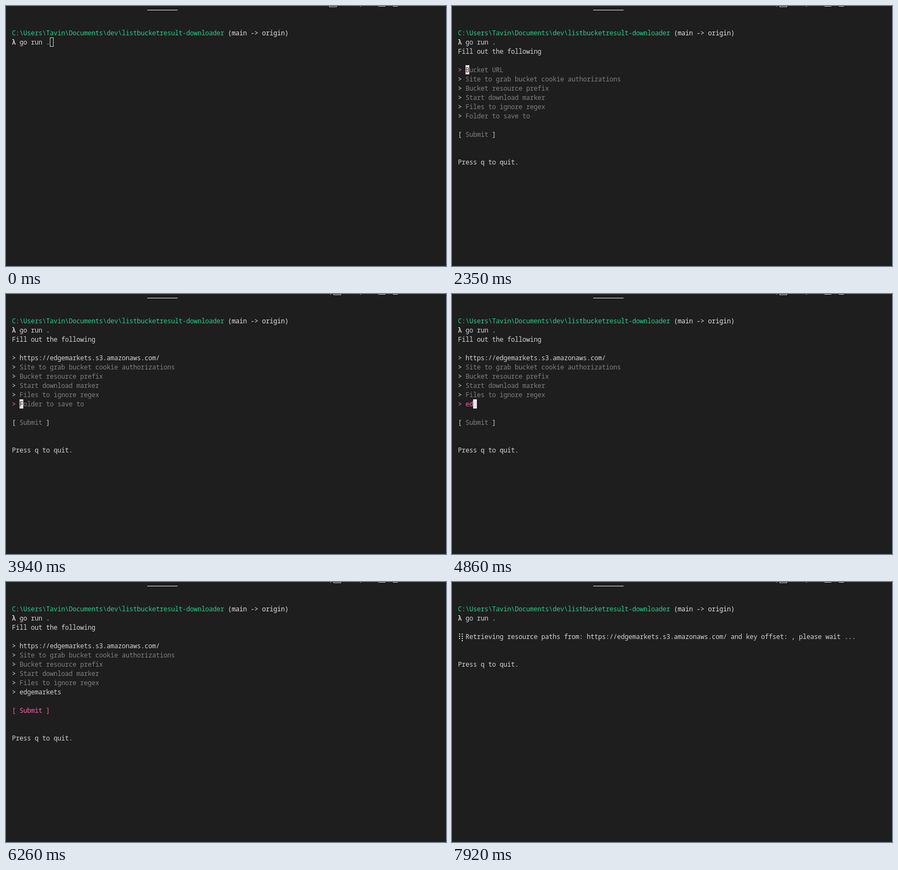
These frames come from a looping animation (813x479 px, 7.99 s). An HTML page:

```html
<!DOCTYPE html>
<html lang="en">
<head>
<meta charset="utf-8">
<title>Terminal form</title>
<style>
  html, body { margin: 0; width: 100%; height: 100%; overflow: hidden; background: #1e1e1e; }
  #stage { position: relative; width: 813px; height: 479px; overflow: hidden; color: #d4d4d4;
    font: 12px/17px "Noto Sans Mono", "DejaVu Sans Mono", monospace;
    letter-spacing: -.2px; font-variant-ligatures: none; }
  #stage div, #stage i, #pointer { position: absolute; }
  .row { left: 11px; height: 17px; white-space: pre; }
  .green { color: #23d18b; }
  .white { color: #e5e5e5; }
  .pink { color: #ff5faf; }
  .gray { color: #808080; }
  .cur { display: inline-block; width: 7px; height: 17px; vertical-align: top; background: #e5e5e5; color: #5a2028; }
  .term { background: #ccc; }
  .hollow { background: none; box-shadow: inset 0 0 0 1px #ccc; }
  .bar { background: #c5c5c5; height: 1px; }
  .box { width: 12px; height: 4px; top: -4px; border: 1px solid #c5c5c5; }
  .dot { width: 2px; height: 2px; background: #d4d4d4; }
  #pointer { left: 0; top: 0; }
</style>
</head>
<body>
<div id="stage">
  <div class="bar" style="left:261px;top:7px;width:56px;background:#e7e7e7"></div>
  <div class="box" id="icon"></div>
  <div class="bar" id="speck" style="left:599px;top:0;width:2px;background:#999"></div>
  <div class="bar" style="left:654px;top:0;width:2px;background:#999"></div>
  <div class="bar" style="left:688px;top:0;width:13px"></div>
  <div class="bar" style="left:715px;top:0;width:9px"></div>
  <div id="screen"></div>
  <svg id="pointer" width="7" height="16" fill="none" stroke="#f0f0f0">
    <path d="M0 .5h7M3.5 0v16M0 15.5h7"/>
  </svg>
</div>
<script>
const LOOP = 7990;
const URL_TEXT = "https://edgemarkets.s3.amazonaws.com/";
const FOLDER = "edgemarkets";
const LABELS = ["Bucket URL", "Site to grab bucket cookie authorizations", "Bucket resource prefix",
  "Start download marker", "Files to ignore regex", "Folder to save to"];

const FORM = 2350, BLINK = 2890, PASTE = 3150, SUBMIT = 6260, FETCH = 6720;
const TABS = [3420, 3550, 3680, 3810, 3940];
const KEYS = [4730, 4820, 4910, 5000, 5200, 5300, 5400, 5470, 5600, 5670, 5800];
const SPINS = [6820, 6920, 7020, 7120, 7220, 7320, 7460, 7575, 7690, 7805, 7920];

// Missing dot of each spinner phase, as column + 2 * row
const GAPS = [0, 2, 4, 6, 7, 5, 3, 1];
const DOT_X = [13, 18], DOT_Y = [95, 99, 103, 107];

const $ = id => document.getElementById(id);
const screenEl = $("screen"), pointer = $("pointer"), icon = $("icon"), speck = $("speck");

const passed = (times, t) => times.filter(x => t >= x).length;
const span = (cls, text) => `<span class="${cls}">${text}</span>`;
const row = (n, html) => `<div class="row" style="top:${41 + 17 * n}px">${html}</div>`;
const cursor = (text = "", cls = "") => span("cur " + cls, text);

function prompt(t) {
  const cur = t < 750 ? cursor("", "hollow") : t < 1410 ? cursor("", "term") : "";
  return row(0, span("green", "C:\\Users\\Tavin\\Documents\\dev\\listbucketresult-downloader") +
      span("white", " (main -&gt; origin)")) +
    row(1, `<b>λ</b> go run .${cur}`) +
    (t >= 1410 && t < FORM ? row(2, cursor("", "term")) : "");
}

function field(i, value, focused, lit) {
  const label = LABELS[i];
  let body;
  if (value) body = focused ? span("pink", value) + cursor() : value;
  else if (focused && lit) body = cursor(label[0]) + span("gray", label.slice(1));
  else body = span("gray", label);
  return row(4 + i, span(focused ? "pink" : "", "&gt;") + " " + body);
}

function form(t) {
  const active = t >= SUBMIT ? 6 : passed(TABS, t);
  const values = { 0: t >= PASTE ? URL_TEXT : "", 5: FOLDER.slice(0, passed(KEYS, t)) };
  const lit = t < BLINK || t >= PASTE;
  return row(2, "Fill out the following") +
    LABELS.map((_, i) => field(i, values[i], i === active, lit)).join("") +
    row(11, active === 6 ? span("pink", "[ Submit ]") : `[ ${span("gray", "Submit")} ]`) +
    row(14, "Press q to quit.");
}

function fetching(t) {
  const gap = GAPS[passed(SPINS, t) % 8];
  let dots = "";
  for (let k = 0; k < 8; k++)
    if (k !== gap) dots += `<i class="dot" style="left:${DOT_X[k % 2]}px;top:${DOT_Y[k >> 1]}px"></i>`;
  return dots +
    row(3, `  Retrieving resource paths from: ${URL_TEXT} and key offset: , please wait ...`) +
    row(6, "Press q to quit.");
}

// Pointer centre, held between screen updates; null while it is away
function pointerAt(t) {
  if (t < 70 || t >= 1890) return null;
  if (t < 1680) {
    const p = Math.min(Math.floor((t - 70) / 76), 8) / 8;
    const e = 1 - (1 - p) ** 2;
    return [744 - 297 * e, 424 - 257 * e];
  }
  const e = [.12, .5, 1][Math.min(Math.floor((t - 1680) / 70), 2)];
  return [447 + 286 * e, 167 + 46 * e];
}

let shown = "";
function render() {
  const t = (performance.now() - start) % LOOP;
  const html = prompt(t) + (t >= FETCH ? fetching(t) : t >= FORM ? form(t) : "");
  if (html !== shown) screenEl.innerHTML = shown = html;

  const shifted = t >= FORM;
  icon.style.left = (shifted ? 605 : 597) + "px";
  speck.style.visibility = shifted ? "visible" : "hidden";

  const at = pointerAt(t);
  pointer.style.visibility = at ? "visible" : "hidden";
  if (at) pointer.style.transform = `translate(${Math.round(at[0]) - 3}px, ${Math.round(at[1]) - 8}px)`;
  requestAnimationFrame(render);
}

const start = performance.now();
render();
</script>
</body>
</html>
```
